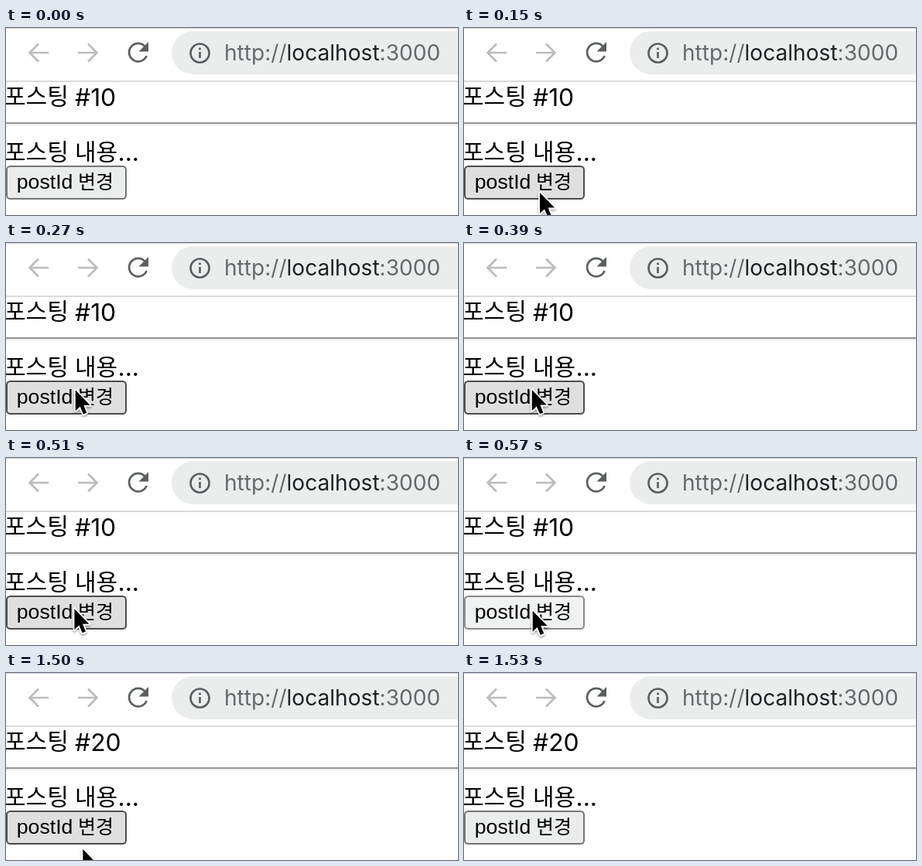
These frames come from a looping animation (584x242 px, 2.28 s). An HTML page:

```html
<!DOCTYPE html>
<html lang="ko">
<head>
<meta charset="utf-8">
<title>postId</title>
<style>
html, body { margin: 0; width: 100%; height: 100%; overflow: hidden; background: #fff; }
svg { display: block; width: 584px; height: 242px; }
text { white-space: pre; }
.ko { font-family: "Noto Sans CJK KR", "Noto Sans CJK JP", "Noto Sans CJK", sans-serif; font-size: 30px; }
.ui { font-family: Inter, "Noto Sans", sans-serif; font-size: 31.8px; }
.url { font-size: 28.1px; fill: #66696c; }
.label { font-family: "Liberation Sans", Arial, sans-serif; font-size: 26.67px; }
.line { fill: none; stroke-width: 2.7; }
</style>
</head>
<body>
<svg viewBox="0 0 584 242">
  <defs>
    <filter id="shadow" x="-50%" y="-50%" width="200%" height="200%">
      <feDropShadow dx="0" dy="2" stdDeviation="1.6" flood-opacity=".38"/>
    </filter>
  </defs>
  <rect width="584" height="242" fill="#fff"/>
  <rect width="584" height="1" fill="#d2d2d2"/>

  <!-- toolbar -->
  <g class="line" stroke="#babcbe">
    <path d="M55 32H31M42 20.500L30.500 32L42 43.500"/>
    <path d="M93 32H117M106 20.500L117.500 32L106 43.500"/>
  </g>
  <path class="line" stroke="#5c5f62" d="M179.500 23.800A11.700 11.700 0 1 0 181.600 36"/>
  <path fill="#5c5f62" d="M184 18V30.500H171.500Z"/>
  <rect x="214" y="4" width="420" height="56" rx="28" fill="#ebeded"/>
  <circle class="line" cx="250.500" cy="32.500" r="12" stroke="#5c5f62"/>
  <path class="line" stroke="#5c5f62" d="M250.500 31V39M250.500 25.500V28.300"/>
  <text class="ui url" x="282" y="42">http://<tspan fill="#202124">localhost</tspan>:3000</text>
  <rect y="68" width="584" height="2" fill="#d9dada"/>

  <!-- page -->
  <text class="ko" x="-2" y="99">포스팅</text>
  <text class="ui" id="post" x="89" y="100.500"></text>
  <rect y="122" width="584" height="2" fill="#969696"/>
  <rect y="124" width="584" height="2" fill="#ececec"/>
  <text class="ko" x="-2" y="170.500">포스팅</text>
  <text class="ko" x="89" y="170.500">내용</text>
  <text class="ui" x="144.500" y="172">...</text>

  <rect id="button" x="1" y="179" width="154" height="42" rx="4.500" stroke-width="2"/>
  <text class="label" x="13.800" y="208">postId</text>
  <text class="ko" x="93" y="207.500" style="font-size:25px">변경</text>

  <g id="cursor" filter="url(#shadow)">
    <path d="M0 0V27L6 21.400L10.200 31.200L14.600 29.400L10.600 19.600H19Z"
      fill="#000" stroke="#fff" stroke-width="3.400" stroke-linejoin="round" paint-order="stroke"/>
  </g>
</svg>
<script>
const LOOP = 2280, STEP = 30;
const $ = id => document.getElementById(id);
const looks = {
  rest: ["#ebecec", "#757575"],
  hover: ["#dfdfdf", "#4c4c4c"],
  press: ["#f0f1f1", "#8b8b8b"]
};
// time, x, y of the pointer tip
const path = [
  [120, 102, 232], [150, 98, 213], [180, 93, 197], [210, 90.7, 190.5],
  [390, 87.8, 190], [570, 88.7, 197.7], [1500, 99.3, 228]
];

function pointer(t) {
  if (t < 120 || t >= 1530) return null;
  const i = path.findLastIndex(p => p[0] <= t);
  const [time, x, y] = path[i];
  if (t >= 570) return [x, y];
  const [end, nextX, nextY] = path[i + 1];
  const k = (t - time) / (end - time);
  return [x + (nextX - x) * k, y + (nextY - y) * k];
}

function buttonState(t) {
  if (t < 150 || t >= 1530) return "rest";
  return t >= 570 && t < 780 ? "press" : "hover";
}

function draw(ms) {
  const t = Math.floor((ms % LOOP) / STEP) * STEP;
  const tip = pointer(t);
  $("cursor").setAttribute("visibility", tip ? "visible" : "hidden");
  if (tip) $("cursor").setAttribute("transform", `translate(${tip})`);
  const [fill, stroke] = looks[buttonState(t)];
  $("button").setAttribute("fill", fill);
  $("button").setAttribute("stroke", stroke);
  $("post").textContent = t < 780 ? "#10" : "#20";
}

const start = performance.now();
function tick() {
  draw(performance.now() - start);
  requestAnimationFrame(tick);
}
tick();
</script>
</body>
</html>
```
